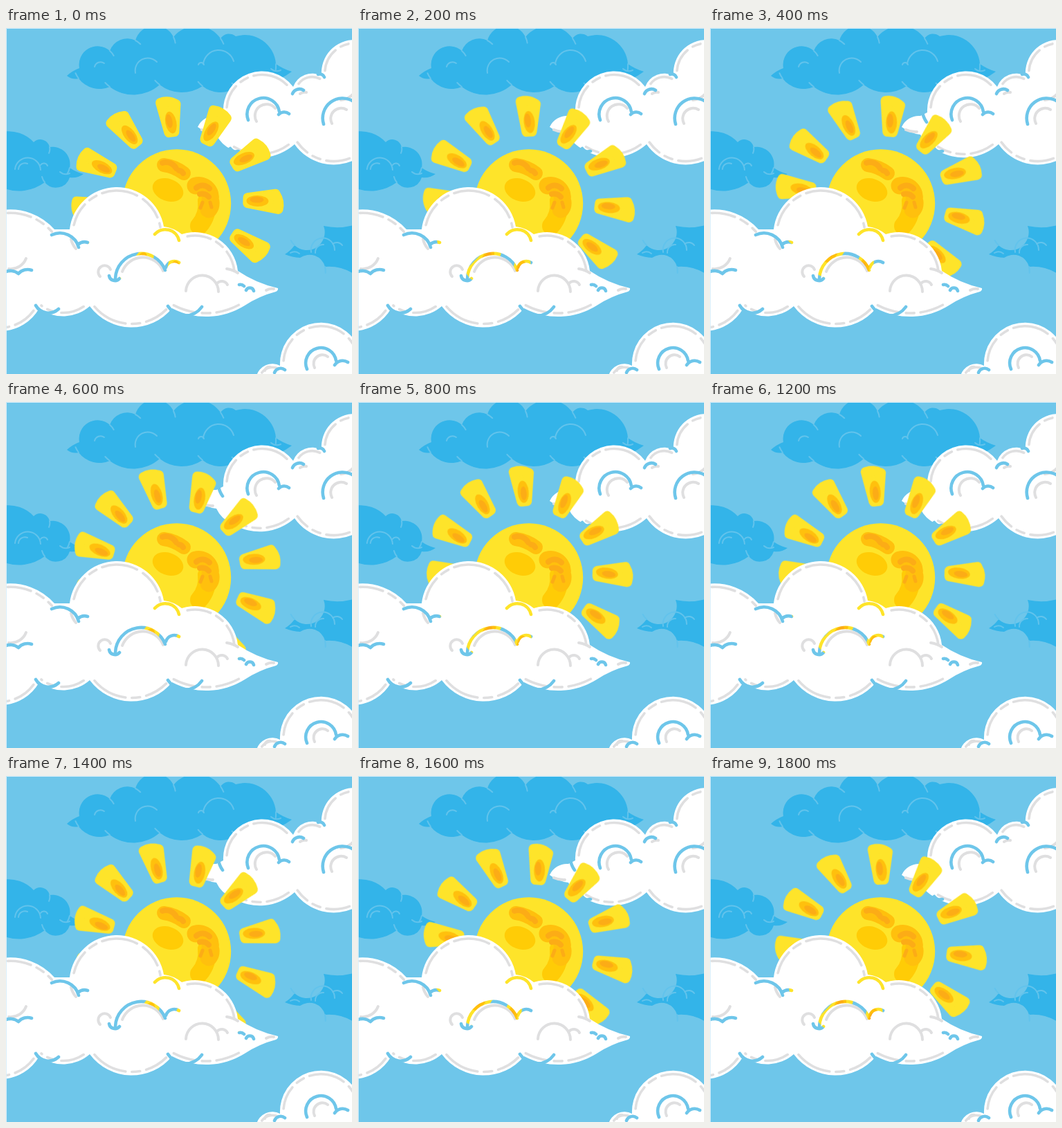
Animation, 500 px wide and 500 px high, one loop 2000 ms. Source, as an HTML page:

```html
<!DOCTYPE html>
<html lang="en">
<head>
<meta charset="utf-8">
<title>Sun behind clouds</title>
<style>
  html, body { margin: 0; width: 100%; height: 100%; overflow: hidden; background: #6ec6ea; }
  svg { display: block; width: 100vw; height: 100vh; }
</style>
</head>
<body>
<svg id="stage" viewBox="0 0 500 500"></svg>
<script>
const SKY = '#6ec6ea', DEEP = '#33b4e9', LINE = '#62c3ec', GREY = '#dfdfe0';
const YELLOW = '#fee42a', GOLD = '#ffcc06', AMBER = '#ffc00d', ORANGE = '#fcac16';
const stage = document.getElementById('stage');

function add(parent, tag, attrs) {
  const el = document.createElementNS('http://www.w3.org/2000/svg', tag);
  for (const key in attrs) el.setAttribute(key, attrs[key]);
  return parent.appendChild(el);
}

// A chain "x,y,bulge x,y,bulge x,y" is a row of circular arcs; a positive
// bulge swells to the left of the direction of travel.
function arcs(text) {
  const keys = text.trim().split(/\s+/).map(k => k.split(',').map(Number));
  return keys.slice(1).map(([x2, y2], i) => {
    const [x1, y1, bulge = 0] = keys[i];
    const dx = x2 - x1, dy = y2 - y1, len = Math.hypot(dx, dy);
    const r = bulge ? (len * len / 4 + bulge * bulge) / (2 * bulge) : 1e5;
    const cx = (x1 + x2) / 2 + dy / len * (bulge - r);
    const cy = (y1 + y2) / 2 - dx / len * (bulge - r);
    return { x1, y1, x2, y2, bulge, r, cx, cy, large: +(Math.abs(bulge) > len / 2) };
  });
}

const arcTo = a => a.bulge
  ? `A${Math.abs(a.r)} ${Math.abs(a.r)} 0 ${a.large} ${+(a.bulge > 0)} ${a.x2} ${a.y2}`
  : `L${a.x2} ${a.y2}`;
const path = list => `M${list[0].x1} ${list[0].y1}` + list.map(arcTo).join('');

// The same arc on a smaller circle.
function inset(a, gap) {
  const k = 1 - gap / a.r;
  const at = (x, y) => [a.cx + (x - a.cx) * k, a.cy + (y - a.cy) * k];
  const [x1, y1] = at(a.x1, a.y1), [x2, y2] = at(a.x2, a.y2);
  return { ...a, x1, y1, x2, y2, r: a.r - gap };
}

// The arc's circle carried on past its end, as a curl into the cloud.
function curl(a, length) {
  const turn = length / a.r, c = Math.cos(turn), s = Math.sin(turn);
  const dx = a.x2 - a.cx, dy = a.y2 - a.cy;
  return { ...a, x1: a.x2, y1: a.y2, x2: a.cx + dx * c - dy * s, y2: a.cy + dx * s + dy * c, large: 0 };
}

function stroke(parent, color, width, d, extra) {
  add(parent, 'path', {
    d, fill: 'none', stroke: color, 'stroke-width': width,
    'stroke-linecap': 'round', 'stroke-linejoin': 'round', ...extra
  });
}
const lines = (parent, color, width, chains) =>
  stroke(parent, color, width, chains.map(c => path(arcs(c))).join(''));

const puffs = list => list.filter(a => a.bulge > 6);

function darkCloud(outline, marks) {
  const edge = arcs(outline);
  add(stage, 'path', { d: path(edge), fill: DEEP });
  stroke(stage, LINE, 2, puffs(edge).map(a => path([curl(a, 9)])).join(''));
  lines(stage, LINE, 2, marks);
}

// White cloud whose blue lines are cut through to whatever lies behind.
function whiteCloud(id, outline, shade, cuts) {
  const edge = arcs(outline);
  const mask = add(stage, 'mask', { id, maskUnits: 'userSpaceOnUse', x: 0, y: 0, width: 500, height: 500 });
  add(mask, 'rect', { width: 500, height: 500, fill: '#fff' });
  lines(mask, '#000', 4.6, cuts);
  const g = add(stage, 'g', { mask: `url(#${id})` });
  add(g, 'path', { d: path(edge), fill: '#fff' });
  stroke(g, GREY, 3.6, puffs(edge).map(a => path([inset(a, 5)])).join(''),
    { 'stroke-dasharray': '34 9 12 9 52 10', 'stroke-dashoffset': -7 });
  lines(g, GREY, 4, shade);
}

add(stage, 'rect', { width: 500, height: 500, fill: SKY });

darkCloud(`88,69,1 106,58,18 150,33,9 187,18,19 242,13,17 310,15,5 332,12,17
  390,52,-1 413,63,2 377,80,9 333,86,8 284,84,10 222,82,13 150,85,8 105,73,2 88,69`,
  ['187,65,13 218,49', '285,52,18 329,48', '278,53,3 286,53', '128,56,4 142,51', '383,59,-2 397,61']);

darkCloud(`-5,150,6 40,165,7 63,172,11 92,202,-1 112,211,2 92,216,11 56,223,8 -5,231`,
  ['13,204,17 50,205', '18,204,4 31,196', '50,198,3 60,199', '78,208,-2 92,210']);

darkCloud(`505,284,3 459,286,20 417,314,1 403,327,-1 425,332,10 461,345,4 505,357`,
  ['441,324,19 475,321', '472,312,3 486,314', '447,325,4 459,313', '411,325,2 424,326']);

whiteCloud('cutTop', `277,143,5 304,127,0 314,122,40 415,85,10 456,69,16 505,17,0
  505,190,17 417,168,15 327,176,3 304,154,2 277,143`,
  ['362,135,15 389,116', '471,138,11 492,118', '484,104,-2 502,95', '283,147,-1 299,150', '425,95,1 434,93'],
  ['350,133,26 395,121', '394,125,3 409,124', '414,95,4 430,90', '451,67,2 460,71',
   '459,139,19 502,106', '307,121,-1 313,136', '324,174,-2 336,178']);

whiteCloud('cutLow', `362,503,9 396,488,44 505,453,0 505,505`,
  ['446,491,10 465,475', '374,495,2 382,490'],
  ['435,493,25 477,481', '475,487,4 494,483', '388,498,4 403,494']);

// Sun
let seed = 11;
const jitter = size => {
  seed = seed * 16807 % 2147483647;
  return (seed / 2147483647 * 2 - 1) * size;
};
const cos = deg => Math.cos(deg * Math.PI / 180);

const rays = add(stage, 'g', { style: 'transform-origin: 251px 245.5px' });
for (let a = 0; a < 360; a += 30) {
  // The ring is a little uneven: pulled round and out toward the left.
  const angle = a - 2 - 6.5 * cos(a - 230);
  const reach = 120 + 4 * cos(angle - 190) + 5 * cos(2 * (angle - 195));
  const g = add(rays, 'g', { transform: `translate(251 245.5) rotate(${angle}) translate(${reach} 0)` });
  const slant = jitter(2.5);
  add(g, 'path', {
    d: `M-22 -4L${20 + slant} -11Q25 0 ${20 - slant} 11L-22 4Z`,
    fill: YELLOW, stroke: YELLOW, 'stroke-width': 14, 'stroke-linejoin': 'round'
  });
  const tilt = `rotate(${jitter(12)})`;
  add(g, 'ellipse', { cx: -8, cy: 0, rx: 16, ry: 8, fill: AMBER, transform: tilt });
  add(g, 'ellipse', { cx: -8 + jitter(3), cy: jitter(2), rx: 10, ry: 4.5, fill: ORANGE, transform: tilt });
}

add(stage, 'circle', { cx: 246.7, cy: 253.7, r: 78.5, fill: YELLOW });
add(stage, 'ellipse', { cx: 234, cy: 234, rx: 23, ry: 16, fill: GOLD, transform: 'rotate(20 234 234)' });
lines(stage, GOLD, 26, ['290,250,4 279,286']);
lines(stage, AMBER, 20, ['228,198,2 257,210']);
lines(stage, AMBER, 25, ['274,228,8 295,248,2 293,262']);
lines(stage, ORANGE, 8, ['226,195,4 246,203', '250,206,1 256,210', '275,231,4 294,232', '280,240,2 293,244']);
lines(stage, ORANGE, 5, ['284,252,0 281,260', '295,252,0 297,259']);

whiteCloud('cutFront', `-5,263,10 70,291,0 92,291,59 228,287,2 254,298,23 335,351,-3 393,376,1
  390,381,-2 345,401,14 240,405,29 121,402,13 48,405,8 -5,438`,
  ['136,359,11 151,349', '168,352,20 227,351', '260,380,23 307,381', '305,369,4 320,371',
   '94,305,-1 101,319', '4,348,-5 29,333', '319,348,1 335,354', '376,379,1 387,377'],
  ['66,299,10 105,317', '104,313,2 118,310', '149,358,-5 164,362', '158,362,30 230,350',
   '231,346,5 250,339', '215,298,11 250,307', '-2,353,3 18,355,3 37,350',
   '43,401,-8 76,406', '234,402,-13 283,403', '337,371,1 344,373', '347,379,4 358,380']);

add(stage, 'path', { d: 'M.5 500V.5H500', fill: 'none', stroke: '#d9effa' });

// The ray ring swings out and back, holding each pose for a fifth of a second.
const poses = Array.from({ length: 11 }, (_, k) => 44 * (1 - Math.abs(k - 5) / 5) ** 1.37);
rays.animate(
  poses.map(a => ({ transform: `rotate(${a}deg)`, easing: 'steps(1, end)' })),
  { duration: 2000, iterations: Infinity }
);
</script>
</body>
</html>
```
